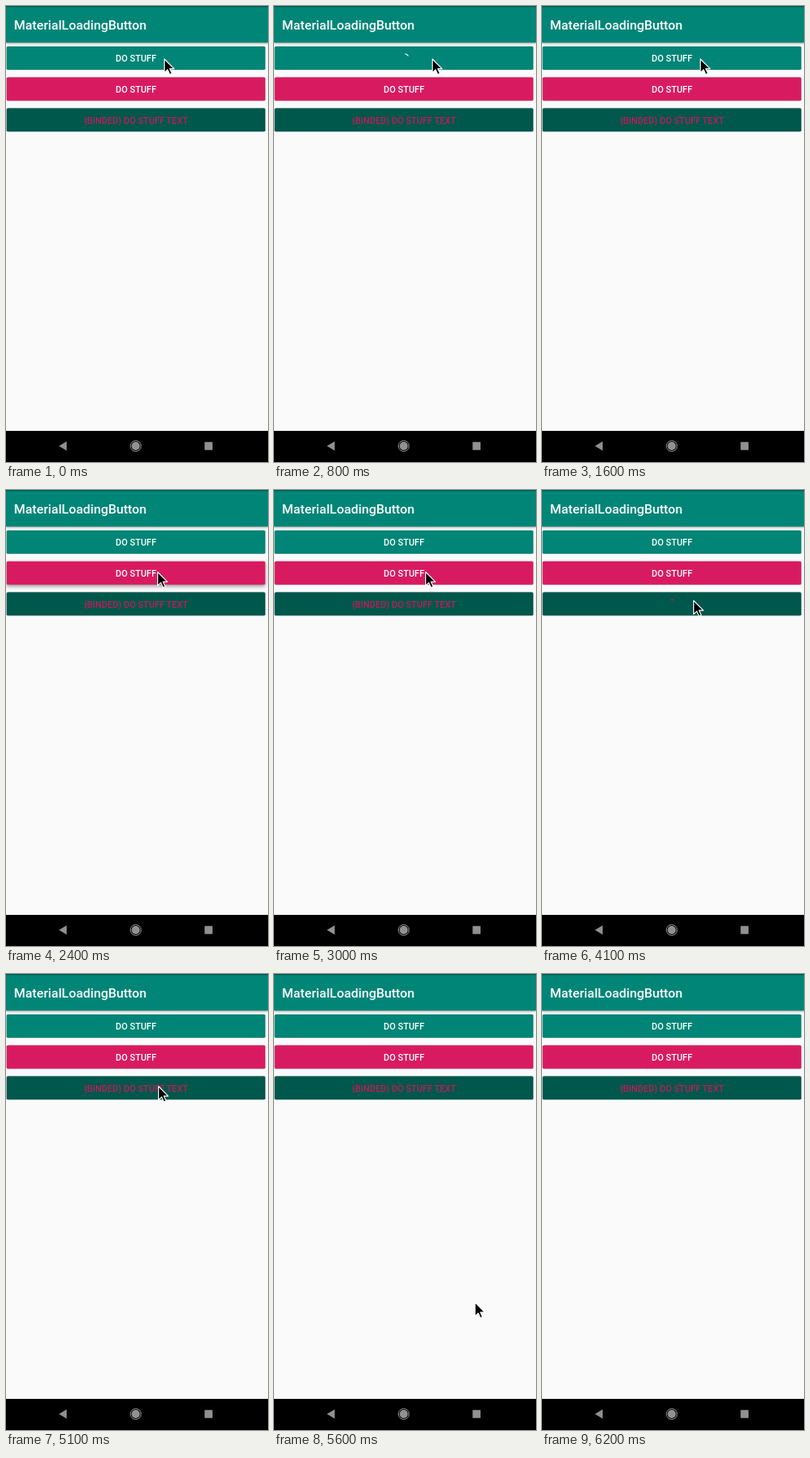
An HTML page that plays this animation: 312 px wide and 542 px high, repeating every 6.3 s.

```html
<!DOCTYPE html>
<html lang="en">
<head>
<meta charset="utf-8">
<title>Loading buttons</title>
<style>
  html, body { margin: 0; width: 100%; height: 100%; overflow: hidden; background: #fafafa; }
  svg { display: block; width: 312px; height: 542px; }
  text { font-family: Roboto, "Noto Sans", sans-serif; font-weight: 500; fill: #fff; }
</style>
</head>
<body>
<svg id="stage" viewBox="0 0 312 542">
  <rect width="312" height="542" fill="#fafafa"/>
  <rect width="312" height="43.5" fill="#008577" style="filter:drop-shadow(0 1px 1px rgba(0,0,0,.35))"/>
  <rect width="312" height="1.2" fill="#00574b"/>
  <text x="9.5" y="28.3" font-size="15.4">MaterialLoadingButton</text>
  <g id="buttons"></g>
  <rect y="505" width="312" height="37" fill="#000"/>
  <g fill="#919191">
    <path d="M63 523L72.3 517.6V528.4Z"/>
    <circle cx="154.5" cy="523" r="4.9"/>
    <circle cx="154.5" cy="523" r="6.4" fill="none" stroke="#919191"/>
    <rect x="236.5" y="518.3" width="9.4" height="9.4" rx=".5"/>
  </g>
  <path id="cursor" d="M0 0V16.2L3.8 12.6L6.4 18.4L9 17.2L6.4 11.6H11.6Z"
        fill="#000" stroke="#fff" stroke-width="1.1" stroke-linejoin="round"/>
</svg>
<script>
const LOOP = 6300, STEP = 100, CENTER = 154.8;
const BUTTONS = [
  { y: 48, fill: '#008577', ink: '#fff', label: 'DO STUFF', press: 500, done: 1400 },
  { y: 84.8, fill: '#d81b60', ink: '#fff', label: 'DO STUFF', press: 2300, done: 3000 },
  { y: 121.6, fill: '#00574b', ink: '#c01b59', label: '(BINDED) DO STUFF TEXT', press: 3900, done: 4500 }
];
// time, x, y of the pointer tip
const POINTER = [
  [1600, 188.6, 63], [2100, 180.6, 97.5], [3300, 180.6, 97.5],
  [3800, 180.6, 131.5], [5000, 180.6, 131.5], [5100, 181.6, 133.5],
  [5700, 244, 411], [6200, 315, 413]
];

const ease = k => k * k * (3 - 2 * k);
const linear = k => k;

function sample(keys, t, curve) {
  if (t <= keys[0][0]) return keys[0].slice(1);
  const i = keys.findIndex(key => key[0] > t);
  if (i < 0) return keys[keys.length - 1].slice(1);
  const a = keys[i - 1], b = keys[i];
  const k = curve((t - a[0]) / (b[0] - a[0]));
  return a.slice(1).map((v, n) => v + (b[n + 1] - v) * k);
}

function add(parent, tag, attrs) {
  const node = document.createElementNS('http://www.w3.org/2000/svg', tag);
  for (const name in attrs) node.setAttribute(name, attrs[name]);
  return parent.appendChild(node);
}

function arc(cx, cy, r, start, sweep) {
  const point = deg => {
    const a = deg * Math.PI / 180;
    return `${cx + r * Math.sin(a)} ${cy - r * Math.cos(a)}`;
  };
  return `M${point(start)}A${r} ${r} 0 ${sweep > 180 ? 1 : 0} 1 ${point(start + sweep)}`;
}

const cursor = document.getElementById('cursor');
const group = document.getElementById('buttons');

for (const b of BUTTONS) {
  b.load = b.press + 200;
  b.elevation = [
    [b.press - 100, 1], [b.press + 100, 3], [b.load, 0.3],
    [b.done - 100, 0.3], [b.done + 200, 1]
  ];
  b.box = add(group, 'rect', { x: 0.7, y: b.y, width: 308, height: 27.7, rx: 1.5, fill: b.fill });
  b.text = add(group, 'text', { x: CENTER, y: b.y + 18, 'font-size': 10.65, 'text-anchor': 'middle' });
  b.text.textContent = b.label;
  b.text.style.fill = b.ink;
  b.spinner = add(group, 'path', { fill: 'none', stroke: b.ink, 'stroke-width': 1.2 });
}

function draw(t) {
  for (const b of BUTTONS) {
    const [e] = sample(b.elevation, t, linear);
    b.box.style.filter = `drop-shadow(0 ${e * 0.7}px ${e * 0.75}px rgba(0,0,0,.4))`;
    const loading = t >= b.load && t < b.done;
    b.text.style.display = loading ? 'none' : '';
    b.spinner.style.display = loading ? '' : 'none';
    if (loading) {
      const age = t - b.load;
      const sweep = 40 + 230 * ease(Math.min(age / 660, 1));
      b.spinner.setAttribute('d', arc(CENTER + 0.4, b.y + 14.2, 5.5, age * 0.27 - 20, sweep));
    }
  }
  const [x, y] = sample(POINTER, t, ease);
  cursor.setAttribute('transform', `translate(${x} ${y})`);
}

const origin = performance.now();
function tick() {
  const t = (performance.now() - origin) % LOOP;
  draw(Math.floor(t / STEP) * STEP);
  requestAnimationFrame(tick);
}
draw(0);
requestAnimationFrame(tick);
</script>
</body>
</html>
```
